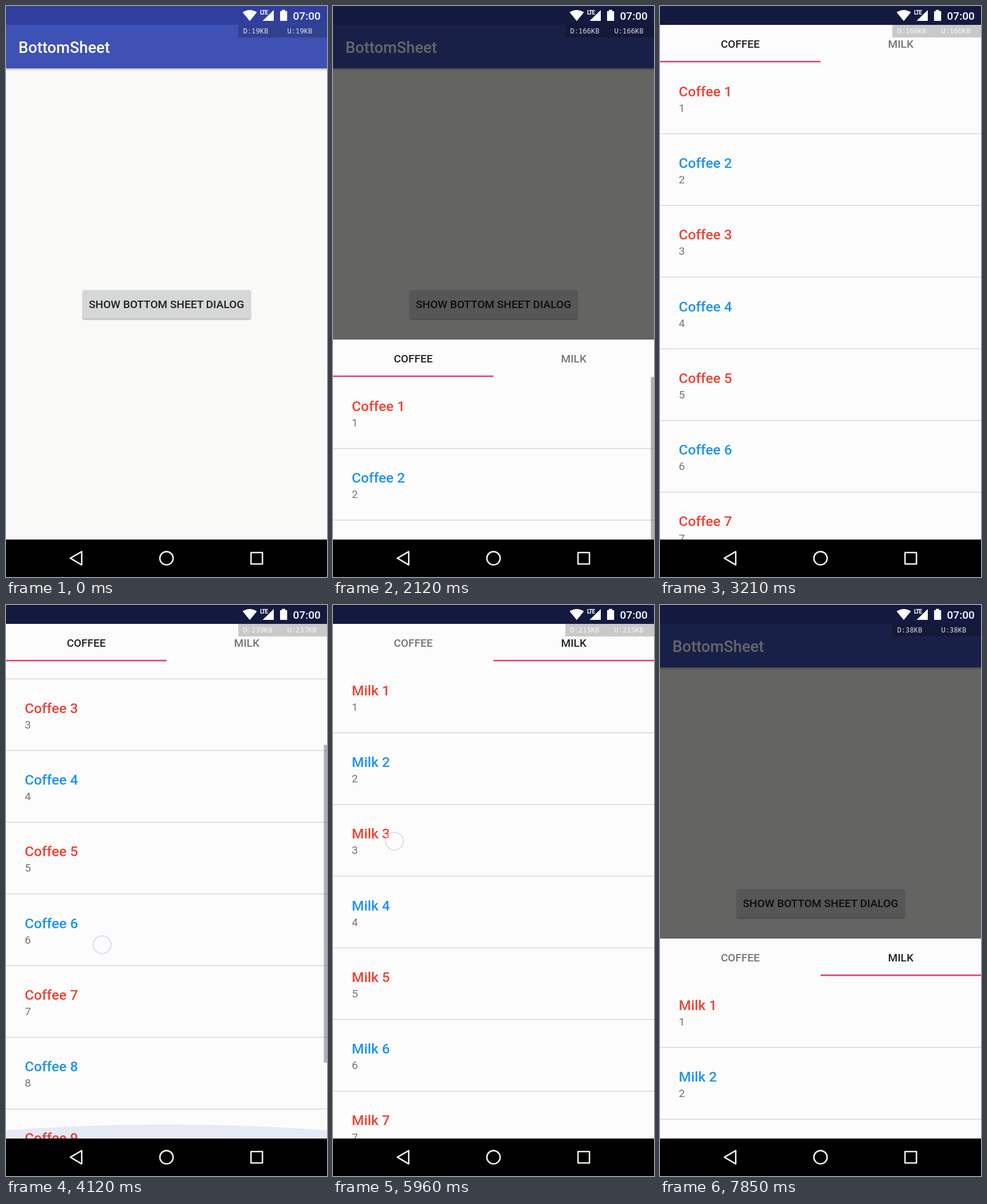
Write an HTML page that moves like this. It is 561 by 998 pixels and loops after 8 s.

```html
<!DOCTYPE html>
<html lang="en">
<head>
<meta charset="utf-8">
<title>BottomSheet</title>
<style>
@property --enter  { syntax: "<number>"; inherits: true; initial-value: 0; }
@property --sheet  { syntax: "<number>"; inherits: true; initial-value: 583; }
@property --scroll { syntax: "<number>"; inherits: true; initial-value: 0; }
@property --page   { syntax: "<number>"; inherits: true; initial-value: 0; }

html, body { margin: 0; width: 100%; height: 100%; overflow: hidden; background: #000; }
svg {
  display: block; width: 100vw; height: 100vh;
  font-family: Roboto, sans-serif; font-weight: 500;
  animation: enter 8s linear infinite, sheet 8s linear infinite,
             scroll 8s linear infinite, page 8s linear infinite;
}

/* 1% = 80 ms */
@keyframes enter {
  0% { --enter: 0; }
  17.19% { --enter: 0; animation-timing-function: cubic-bezier(.37, 0, .63, 1); }
  19.07%, 100% { --enter: 1; }
}
@keyframes sheet {
  0% { --sheet: 583; }
  30% { --sheet: 583; animation-timing-function: cubic-bezier(.4, 0, .8, .7); }
  33.75% { --sheet: 250; animation-timing-function: cubic-bezier(.2, .6, .4, 1); }
  37.5% { --sheet: 33; }
  92.4% { --sheet: 33; animation-timing-function: cubic-bezier(.4, 0, .8, .7); }
  95% { --sheet: 333; animation-timing-function: cubic-bezier(.2, .6, .4, 1); }
  98.1%, 100% { --sheet: 583; }
}
@keyframes scroll {
  0% { --scroll: 0; }
  41.6% { --scroll: 0; animation-timing-function: cubic-bezier(.4, 0, .8, .8); }
  45.2% { --scroll: 420; }
  48.75% { --scroll: 420; animation-timing-function: cubic-bezier(.4, 0, .8, .7); }
  51.54% { --scroll: 216.5; animation-timing-function: cubic-bezier(.2, .4, .5, 1); }
  54.5%, 100% { --scroll: 0; }
}
@keyframes page {
  0% { --page: 0; }
  61.5% { --page: 0; animation-timing-function: cubic-bezier(.4, 0, .8, .7); }
  64.5% { --page: .46; animation-timing-function: cubic-bezier(.2, .6, .3, 1); }
  68.75%, 100% { --page: 1; }
}
@keyframes ripple {
  0%, 9.5% { opacity: 0; }
  12%, 15% { opacity: .1; }
  17%, 100% { opacity: 0; }
}
@keyframes bar {
  0%, 28.6% { opacity: .3; }
  31.5%, 41.5% { opacity: 0; }
  41.8%, 57% { opacity: .3; }
  60%, 100% { opacity: 0; }
}
@keyframes glow {
  0%, 45.2% { opacity: 0; transform: scaleY(0); }
  47.5% { opacity: .2; transform: scaleY(2); }
  51.5% { opacity: .11; transform: none; }
  55%, 100% { opacity: 0; transform: scaleY(0); }
}
@keyframes on  { 0% { fill: #212121; } 64.5%, 100% { fill: #757575; } }
@keyframes off { 0% { fill: #757575; } 64.5%, 100% { fill: #212121; } }
@keyframes press {
  0% { opacity: 0; }
  9.25% { opacity: 1; }  14% { opacity: 0; }
  28.6% { opacity: 1; }  34.2% { opacity: 0; }
  40.9% { opacity: 1; }  46% { opacity: 0; }
  48.25% { opacity: 1; } 54% { opacity: 0; }
  60.9% { opacity: 1; }  64.7% { opacity: 0; }
  71.6% { opacity: 1; }  76.6% { opacity: 0; }
  78.75% { opacity: 1; } 88.75% { opacity: 0; }
  89.5% { opacity: 1; }  95.5%, 100% { opacity: 0; }
}
@keyframes finger {
  0%, 14% { transform: translate(280px, 522px); }
  28.6% { transform: translate(165px, 800px); }
  30% { transform: translate(165px, 800px); animation-timing-function: cubic-bezier(.4, 0, .8, .7); }
  33.75%, 34.2% { transform: translate(178px, 467px); }
  40.9% { transform: translate(160px, 790px); }
  41.6% { transform: translate(160px, 790px); animation-timing-function: cubic-bezier(.4, 0, .8, .8); }
  45.2%, 46% { transform: translate(172px, 357px); }
  48.25% { transform: translate(161px, 380px); }
  48.75% { transform: translate(161px, 380px); animation-timing-function: cubic-bezier(.4, 0, .8, .7); }
  51.54% { transform: translate(168px, 597px); }
  53.9%, 54% { transform: translate(176px, 770px); }
  60.9% { transform: translate(430px, 520px); }
  61.5% { transform: translate(430px, 520px); animation-timing-function: cubic-bezier(.4, 0, .8, .7); }
  64.5%, 64.7% { transform: translate(170px, 510px); }
  71.6% { transform: translate(103px, 411px); }
  74.5% { transform: translate(107px, 411px); }
  76.4%, 76.6% { transform: translate(143px, 677px); }
  78.75%, 82% { transform: translate(126px, 440px); }
  86%, 88.75% { transform: translate(190px, 732px); }
  89.5% { transform: translate(217px, 445px); }
  92.4% { transform: translate(217px, 445px); animation-timing-function: cubic-bezier(.4, 0, .8, .7); }
  95%, 100% { transform: translate(235px, 745px); }
}

.dim { opacity: calc(var(--enter) * .6); }
.window { opacity: var(--enter); transform: translateY(calc((1 - var(--enter)) * 199.6px)); }
.sheet { transform: translateY(calc(var(--sheet) * 1px)); }
.pages { transform: translateX(calc(var(--page) * -561px)); }
.list { transform: translateY(calc(var(--scroll) * -1px)); }
.mark { transform: translateX(calc(var(--page) * 280.5px)); fill: #dc4676; }
.thumb { transform: translateY(calc(var(--scroll) * .6653px)); }
.bar { animation: bar 8s linear infinite; }
.ripple { animation: ripple 8s linear infinite; }
.glow { fill: #3f51b5; transform-origin: 0 932.5px; animation: glow 8s linear infinite; }
.on { animation: on 8s step-end infinite; }
.off { animation: off 8s step-end infinite; }
.touch { animation: finger 8s linear infinite, press 8s step-end infinite; }

.mid { text-anchor: middle; font-size: 19.1px; }
.name { font-size: 24.5px; fill: #ee4336; }
.name.even { fill: #2094ea; }
.sub { font-size: 19.1px; font-weight: 400; fill: #757575; }
.net { font: 400 12.2px "Noto Sans Mono", monospace; fill: #fff; fill-opacity: .88; }
.lte { font-size: 10px; font-weight: 700; letter-spacing: -1.1px; }
</style>
</head>
<body>
<svg viewBox="0 0 561 998">
  <defs>
    <linearGradient id="shade" x2="0" y2="1">
      <stop stop-opacity=".22"/><stop offset="1" stop-opacity="0"/>
    </linearGradient>
    <filter id="soft" x="-5%" y="-20%" width="110%" height="140%"><feGaussianBlur stdDeviation="1.3"/></filter>
    <clipPath id="body"><rect y="65.5" width="561" height="900"/></clipPath>
  </defs>

  <g class="app">
    <rect width="561" height="998" fill="#f9faf7"/>
    <rect y="109" width="561" height="5" fill="url(#shade)"/>
    <rect y="32" width="561" height="77" fill="#3f51b5"/>
    <rect width="561" height="32.7" fill="#303f9f"/>
    <text x="21.8" y="81.5" font-size="27.27" fill="#fff">BottomSheet</text>
    <rect x="134" y="498" width="293.5" height="50" rx="2.7" opacity=".35" filter="url(#soft)"/>
    <rect x="134" y="496.5" width="293.5" height="50" rx="2.7" fill="#d6d7d7"/>
    <rect class="ripple" x="134" y="496.5" width="293.5" height="50" rx="2.7"/>
    <text class="mid" x="280.5" y="528.3" fill="#1e1e1e">SHOW BOTTOM SHEET DIALOG</text>
    <rect y="932.5" width="561" height="66"/>
  </g>

  <rect class="dim" width="561" height="998"/>

  <g class="window">
    <g class="sheet">
      <rect width="561" height="966" fill="#fcfcfc"/>
      <g clip-path="url(#body)">
        <g class="pages">
          <g class="list" id="coffee"></g>
          <g id="milk" transform="translate(561 0)"></g>
        </g>
        <g class="bar"><rect class="thumb" x="555.5" y="65.5" width="5.5" height="555.5"/></g>
      </g>
      <text class="mid on" x="140.25" y="40">COFFEE</text>
      <text class="mid off" x="420.75" y="40">MILK</text>
      <rect class="mark" y="62.8" width="280.5" height="2.7"/>
    </g>
    <path class="glow" d="M0 932.5V918Q280.5 898 561 918V932.5Z"/>
    <rect y="932.5" width="561" height="66"/>
  </g>

  <g fill="none" stroke="#eeeee8" stroke-width="2.6" stroke-linejoin="round">
    <path d="M112.5 965.2L132.3 953.6V976.8Z"/>
    <circle cx="280.5" cy="965.2" r="11.6"/>
    <rect x="428.2" y="955.2" width="20" height="20"/>
  </g>

  <g fill="#fff">
    <path d="M413.5 11Q426 3 438.5 11L426 26.3Z"/>
    <path d="M448.5 26L468 7V26Z"/>
    <text class="lte" x="444" y="14.8">LTE</text>
    <path d="M479 9H482V6.8H488V9H491.3V26H479Z"/>
    <text x="501.5" y="24" font-size="19.1">07:00</text>
  </g>

  <rect x="406" y="32.7" width="155" height="22.3" opacity=".2"/>
  <text class="net" id="down" x="414.5" y="48.4"></text>
  <text class="net" id="up" x="491.5" y="48.4"></text>

  <circle class="touch" r="15.5" fill="#fff" fill-opacity=".35" stroke="#c6c6e6" stroke-opacity=".8" stroke-width="1.6"/>
</svg>
<script>
const $ = id => document.getElementById(id);
const ROW = 125.3, TOP = 65.5, LOOP = 8000;

function fill(id, name) {
  let out = "";
  for (let n = 1; n <= 10; n++) {
    const y = TOP + (n - 1) * ROW;
    out += `<text class="name ${n % 2 ? "" : "even"}" x="32.7" y="${y + 59.1}">${name} ${n}</text>
      <text class="sub" x="32.7" y="${y + 86.3}">${n}</text>
      <rect y="${y + 124.3}" width="561" height="1" fill="#c6c6cc"/>`;
  }
  $(id).innerHTML = out;
}
fill("coffee", "Coffee");
fill("milk", "Milk");

// [start ms, download, upload]
const traffic = [
  [0, 19, 19], [1120, 27, 27], [2120, 166, 166], [3240, 239, 237],
  [4260, 228, 226], [5270, 215, 215], [6320, 204, 204], [7400, 38, 38]
];
let start;
function tick(now) {
  start ??= now;
  const t = (now - start) % LOOP;
  const [, down, up] = traffic.findLast(r => r[0] <= t);
  $("down").textContent = `D:${down}KB`;
  $("up").textContent = `U:${up}KB`;
  requestAnimationFrame(tick);
}
requestAnimationFrame(tick);
</script>
</body>
</html>
```
